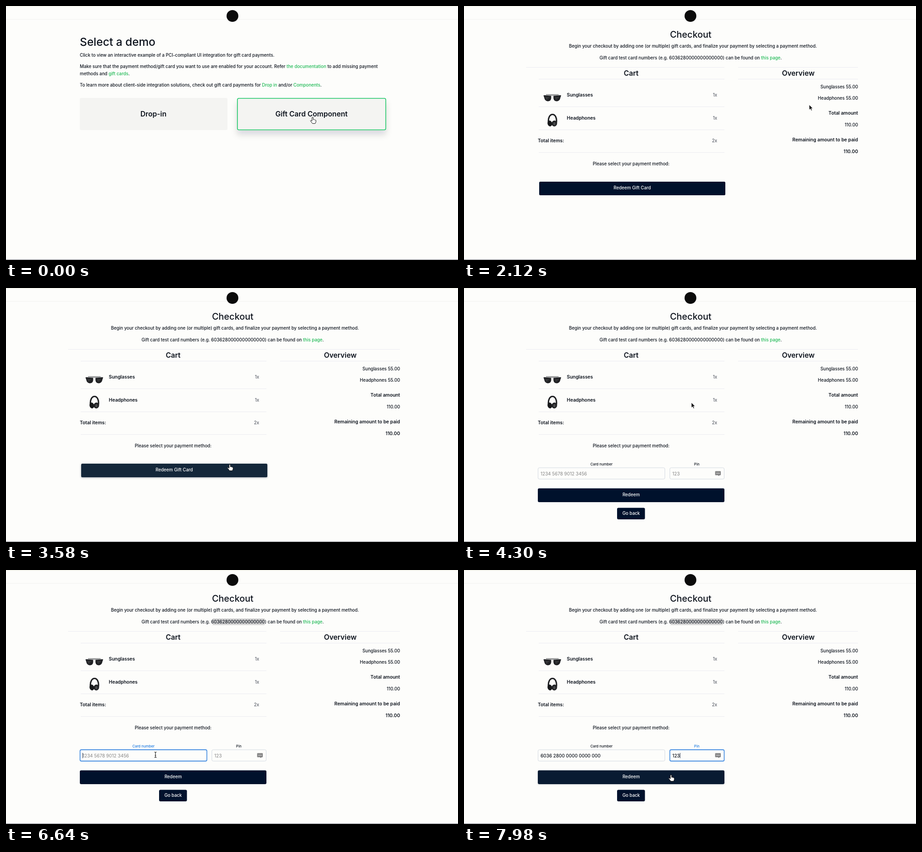
Recreate the animation shown at these times as an HTML page. Size 998 px wide and 561 px high, loop 8000 ms.

```html
<!DOCTYPE html>
<html lang="en">
<head>
<meta charset="utf-8">
<title>Gift card checkout</title>
<style>
  html, body { margin: 0; width: 100%; height: 100%; overflow: hidden; background: #fdfdfb; }
  svg { display: block; width: 998px; height: 561px; }
  text { font: 500 9.75px Inter, sans-serif; font-optical-sizing: none; fill: #0d131d; white-space: pre; }
  .title { font-size: 20px; }
  .head { font-size: 15.7px; font-weight: 600; }
  .bold { font-size: 10.35px; font-weight: 600; }
  .mid { text-anchor: middle; }
  .end { text-anchor: end; }
  .grey { fill: #5c616b; }
  .link { fill: #1db954; }
  .white { fill: #fff; font-size: 9.8px; }
  .label { font-size: 7.9px; }
  .value { font-size: 10px; }
  .hint { fill: #858585; font-weight: 400; }
  .rule { stroke: #ebebf1; fill: none; }
  .field { fill: #fdfdfb; }
  .button { fill: #00112c; }
</style>
</head>
<body>
<svg viewBox="0 0 998 561">
  <defs>
    <filter id="soft" x="-20%" y="-50%" width="140%" height="230%">
      <feDropShadow dx="0" dy="10" stdDeviation="7" flood-color="#00112c" flood-opacity=".14"/>
    </filter>
    <g id="sunglasses">
      <path d="M-14-6.500H14M-19-4.500H19" stroke="#55575a" fill="none"/>
      <path d="M-19.500-4.500L-2.500-3.500V2Q-3.500 8.500-10 8.500Q-16.500 8-18 0ZM19.500-4.500L2.500-3.500V2Q3.500 8.500 10 8.500Q16.500 8 18 0Z" fill="#202124"/>
      <path d="M-16-2L-6-1L-13 6ZM16-2L6-1L8 6Z" fill="#333436"/>
    </g>
    <g id="headphones">
      <path d="M-8.500 6C-11-18 12-18 9 6" stroke="#202124" stroke-width="3.200" fill="none"/>
      <ellipse cx="-5.500" cy="8" rx="5" ry="6.500" fill="#17181a" transform="rotate(-14 -5.500 8)"/>
      <ellipse cx="4.500" cy="8" rx="6" ry="6.500" fill="#202124" transform="rotate(14 4.500 8)"/>
      <ellipse cx="4.500" cy="8.500" rx="2.500" ry="3.500" fill="#48494b"/>
    </g>
  </defs>

  <rect width="998" height="561" fill="#fdfdfb"/>
  <path d="M0 1H998" stroke="#eeeee0"/>
  <path d="M0 29.500H998" stroke="#f2f2ef"/>
  <path d="M0 559.500H998" stroke="#e9e9e9"/>
  <path d="M0 560.500H998" stroke="#85898f"/>
  <circle cx="500" cy="22" r="13" fill="#0b0b0b"/>

  <g id="demo">
    <text x="163" y="88" style="font-size:24.6px">Select a demo</text>
    <text x="163" y="111.500">Click to view an interactive example of a PCI-compliant UI integration for gift card payments.</text>
    <text x="163" y="137">Make sure that the payment method/gift card you want to use are enabled for your account. Refer <tspan class="link">the documentation</tspan> to add missing payment</text>
    <text x="163" y="152.500">methods and <tspan class="link">gift cards</tspan>.</text>
    <text x="163" y="178">To learn more about client-side integration solutions, check out gift card payments for <tspan class="link">Drop in</tspan> and/or <tspan class="link">Components</tspan>.</text>
    <rect x="163" y="203" width="326" height="71" rx="3" fill="#f4f4f2"/>
    <rect x="511" y="204" width="327.500" height="69.500" rx="3" fill="#f4f4f2" stroke="#1cc766" stroke-width="1.600" filter="url(#soft)"/>
    <text x="325.500" y="244" class="head mid">Drop-in</text>
    <text x="674.500" y="244" class="head mid">Gift Card Component</text>
  </g>

  <g id="cart">
    <text x="500.500" y="69.500" class="title mid">Cart</text>
    <path class="rule" d="M135 82.500H870M155 132.500H870M155 183.500H870"/>
    <use href="#sunglasses" x="190" y="112"/>
    <use href="#headphones" x="190" y="162"/>
    <text x="222" y="110" class="bold">Sunglasses</text>
    <text x="222" y="161" class="bold">Headphones</text>
    <text x="854" y="110" class="grey end">55.00</text>
    <text x="854" y="161" class="grey end">55.00</text>
    <text x="586" y="219" class="bold">Total:</text>
    <text x="660" y="219" class="bold end">110.00</text>
    <rect id="continue" class="button" x="678" y="199" width="192" height="34.500" rx="3"/>
    <text x="774" y="219" class="white mid">Continue to checkout</text>
  </g>

  <g id="checkout">
    <text x="500.500" y="69.500" class="title mid">Checkout</text>
    <text x="505.500" y="92" class="mid">Begin your checkout by adding one (or multiple) gift cards, and finalize your payment by selecting a payment method.</text>
    <rect id="selection" x="456" y="107" width="115" height="14.500"/>
    <text x="500.500" y="117.500" class="mid">Gift card test card numbers (e.g. 6036280000000000000) can be found on <tspan class="link">this page</tspan>.</text>
    <path class="rule" d="M137 135.500H575M605 135.500H870M165 161.500H575M605 161.500H870M165 222.500H575M165 273.500H575M165 323.500H575"/>
    <text x="369" y="153.500" class="head mid">Cart</text>
    <text x="738" y="153.500" class="head mid">Overview</text>
    <use href="#sunglasses" x="195" y="202"/>
    <use href="#headphones" x="195" y="251.500"/>
    <text x="227" y="199.500" class="bold">Sunglasses</text>
    <text x="227" y="250.500" class="bold">Headphones</text>
    <text x="163" y="301" class="bold">Total items:</text>
    <text x="559" y="199.500" class="grey end">1x</text>
    <text x="559" y="250.500" class="grey end">1x</text>
    <text x="559" y="301" class="grey end">2x</text>
    <text x="870" y="181.500" class="end">Sunglasses 55.00</text>
    <text x="870" y="207" class="end">Headphones 55.00</text>
    <text x="870" y="240" class="bold end">Total amount</text>
    <text x="870" y="265.500" class="end">110.00</text>
    <text x="870" y="299" class="bold end">Remaining amount to be paid</text>
    <text x="870" y="324.500" class="bold end">110.00</text>
    <text x="369" y="352" class="mid">Please select your payment method:</text>

    <g id="giftButton">
      <rect id="redeemCard" class="button" x="166" y="388" width="411" height="30" rx="2.500"/>
      <text x="371.500" y="405" class="white mid">Redeem Gift Card</text>
    </g>

    <g id="form">
      <text id="cardLabel" x="303.500" y="391.500" class="label mid">Card number</text>
      <text id="pinLabel" x="514" y="391.500" class="label mid">Pin</text>
      <rect id="cardField" class="field" x="163.500" y="397" width="280" height="25" rx="3"/>
      <rect id="pinField" class="field" x="454.500" y="397" width="120" height="25" rx="3"/>
      <text id="cardValue" x="169" y="413.500"></text>
      <text id="pinValue" x="460" y="413.500"></text>
      <path d="M555 405H566.500V413H564L562.500 415L561 413H555Z" fill="#858585" stroke="#858585" stroke-linejoin="round"/>
      <path d="M557.500 409.200H565" stroke="#fff" stroke-width="1.400" stroke-dasharray="1.500 1.200"/>
      <path id="caret" d="M0 404V415.500" stroke="#00112c" stroke-width=".9"/>
      <rect id="redeem" class="button" x="163" y="442.500" width="412" height="30.500" rx="3"/>
      <text x="369" y="460" class="white mid">Redeem</text>
      <rect class="button" x="338" y="485.500" width="61.500" height="25.500" rx="3"/>
      <text x="369" y="500.500" class="white mid">Go back</text>
    </g>
  </g>

  <g id="cursor">
    <path id="hand" d="M-1.300 8V.8a1.300 1.300 0 0 1 2.600 0V5l1-.5 1 .8 1.200-.4 1 .9 1.300.2.500 1V10l-1.600 3.600H-.3L-3 10l-2-2.400 1.200-1.200z" fill="#fff" stroke="#111" stroke-width="1"/>
    <path id="arrow" d="M0 0V11.500L2.700 9 4.600 13.200 6.500 12.400 4.700 8.300H8.200Z" fill="#111" stroke="#fff" stroke-width=".8"/>
    <path id="beam" d="M-2.500-6Q0-6 0-4.500Q0-6 2.500-6M0-4.500V4.500M-2.500 6Q0 6 0 4.500Q0 6 2.500 6M-1.300 1.500H1.300" fill="none" stroke="#111" stroke-width="1.100"/>
  </g>
</svg>
<script>
const LOOP = 8000;
const $ = id => document.getElementById(id);

// Moments (ms) at which the page reacts
const CART = 520, CHECKOUT = 1700, FORM = 3750, SELECT = 4950;
const FOCUS_CARD = 6300, PASTE = 6900, FOCUS_PIN = 7300;
const PIN_KEYS = [7420, 7540, 7660];

// Cursor hot spot: time, x, y
const PATH = [
  [0, 677, 246], [600, 677, 246], [1150, 763, 218], [2350, 762, 218],
  [3150, 494, 390], [3900, 494, 390], [4700, 510, 117], [5500, 510, 117],
  [6200, 330, 408], [6950, 330, 408], [7250, 505, 409], [7500, 505, 409],
  [7900, 457, 453], [LOOP, 457, 453]
];
const SHAPES = [
  [0, 'hand'], [CART, 'arrow'], [1020, 'hand'], [CHECKOUT, 'arrow'], [3020, 'hand'],
  [FORM, 'arrow'], [4620, 'beam'], [5600, 'arrow'], [6130, 'beam'],
  [7640, 'arrow'], [7780, 'hand']
];

const clamp = v => Math.min(1, Math.max(0, v));
const ease = v => v * v * (3 - 2 * v);
const show = (id, on) => $(id).style.display = on ? '' : 'none';

function cursorAt(t) {
  const i = PATH.findIndex(p => p[0] > t);
  const [t0, x0, y0] = PATH[i - 1], [t1, x1, y1] = PATH[i];
  const k = ease((t - t0) / (t1 - t0));
  return [x0 + (x1 - x0) * k, y0 + (y1 - y0) * k];
}

function hover(id, start, t) {
  const k = clamp((t - start) / 300);
  const mix = (a, b) => Math.round(a + (b - a) * k);
  $(id).style.fill = `rgb(${mix(0, 20)},${mix(17, 39)},${mix(44, 58)})`;
  $(id).style.filter = k ? `drop-shadow(0 1.5px 2px rgba(0,17,44,${0.35 * k}))` : 'none';
}

function field(name, focused, value, hint) {
  const box = $(name + 'Field'), text = $(name + 'Value');
  box.style.stroke = focused ? '#4a90e2' : '#d3d9e1';
  box.style.strokeWidth = focused ? 1.8 : 1;
  $(name + 'Label').style.fill = focused ? '#1f7be0' : '';
  text.textContent = value || hint;
  text.setAttribute('class', value ? 'value' : 'value hint');
  if (focused) {
    const x = +text.getAttribute('x') + (value ? text.getComputedTextLength() + 0.5 : 0.5);
    $('caret').setAttribute('transform', `translate(${x})`);
  }
}

function render(t) {
  show('demo', t < CART);
  show('cart', t >= CART && t < CHECKOUT);
  show('checkout', t >= CHECKOUT);
  show('giftButton', t < FORM);
  show('form', t >= FORM);
  show('selection', t >= SELECT);
  show('caret', t >= FOCUS_CARD);
  $('selection').style.fill = t < FOCUS_CARD ? '#a9cef6' : '#d2d2d2';

  hover('continue', 1020, t);
  hover('redeemCard', 3020, t);
  hover('redeem', 7850, t);

  field('card', t >= FOCUS_CARD && t < FOCUS_PIN,
    t >= PASTE ? '6036 2800 0000 0000 000' : '', '1234 5678 9012 3456');
  field('pin', t >= FOCUS_PIN, '123'.slice(0, PIN_KEYS.filter(k => t >= k).length), '123');

  const shape = SHAPES.filter(s => s[0] <= t).pop()[1];
  for (const id of ['hand', 'arrow', 'beam']) show(id, id === shape);
  $('cursor').setAttribute('transform', `translate(${cursorAt(t)})`);
}

const start = performance.now();
function tick() {
  render((performance.now() - start) % LOOP);
  requestAnimationFrame(tick);
}
tick();
</script>
</body>
</html>
```
